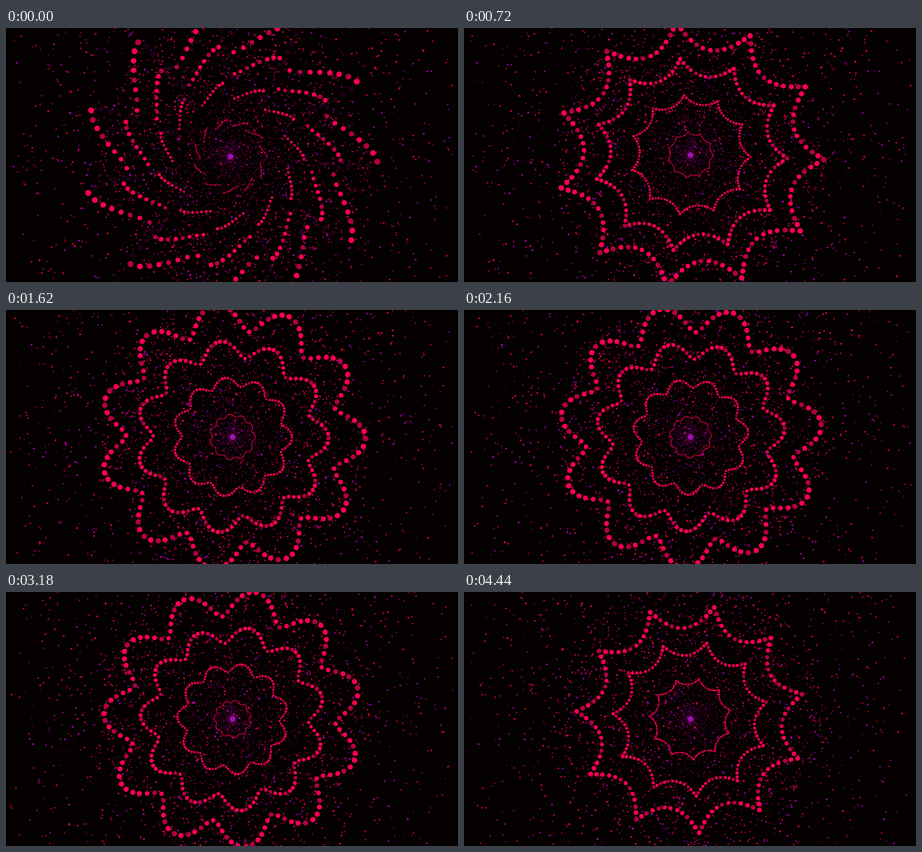
Write an HTML page with a canvas that moves like this. It is 800 px wide and 450 px high and loops after 4.5 s.

```html
<!DOCTYPE html>
<html lang="en">
<head>
<meta charset="utf-8">
<title>Flower tunnel</title>
<style>
html, body { margin: 0; width: 100%; height: 100%; overflow: hidden; background: #040100; }
canvas { display: block; }
</style>
</head>
<body>
<canvas id="stage" width="800" height="450"></canvas>
<script>
const ctx = document.getElementById('stage').getContext('2d');
const LOOP = 4500, LOBES = 11, DOTS_PER_LOBE = 12, GAP = 65;
const TAU = Math.PI * 2, DEG = Math.PI / 180;
const RED = '#ff0050', WINE = '#b4003f', PURPLE = '#aa00b8', PLUM = '#4c0044';

let seed = 7;
function random() {
  seed = (seed * 1664525 + 1013904223) % 4294967296;
  return seed / 4294967296;
}

function ease(t, from, to) {
  const f = Math.min(1, Math.max(0, (t - from) / (to - from)));
  return f * f * (3 - 2 * f);
}

const stars = Array.from({ length: 1050 }, () => ({
  reach: 392 * Math.sqrt(random()), angle: TAU * random(), y: 450 * random(),
  size: 1 + .9 * random(), alpha: .5 + .5 * random(),
  color: random() < .6 ? '#e80048' : PURPLE,
}));

const dust = Array.from({ length: 2200 }, () => {
  const r = 2 + 240 * Math.pow(random(), 1.4);
  return {
    r, angle: TAU * random(), alpha: .4 + .5 * random(),
    size: .6 + r * .004 * (.5 + random()),
    color: random() < .2 + .75 * Math.exp(-r / 40) ? PURPLE : '#d80046',
  };
});

// The petals start swept back, open into scallops, round off, sweep again and sharpen.
function poseAt(t) {
  const settle = ease(t, 0, 720), turn = ease(t, 1300, 3100);
  const sweep = ease(t, 3180, 3900), close = ease(t, 3900, 4440);
  const skew = .9 * (1 - settle) + sweep - close;
  return {
    skew,
    tip: (2 - 16 * turn + 7 * sweep - 5.5 * close) * DEG,
    radius: 260 - 24 * settle - 8 * turn + 7 * sweep - 33 * close,
    cusp: .3 + .5 * settle - 1.1 * ease(t, 720, 1620) + 1.1 * close,
    depth: .1 + .05 * skew,
    x: 401 - 4 * skew,
    y: 225 + 3 * skew,
  };
}

function dot(x, y, r, color, alpha = 1) {
  ctx.globalAlpha = alpha;
  ctx.fillStyle = color;
  ctx.beginPath();
  ctx.arc(x, y, r, 0, TAU);
  ctx.fill();
}

function polarDot(pose, r, angle, size, color, alpha) {
  dot(pose.x + r * Math.cos(angle), pose.y + r * Math.sin(angle), size, color, alpha);
}

// One lobe, tip to tip, as points spaced evenly along the curve.
function lobePoints({ tip, skew, cusp, depth }, tipR, level) {
  const wave = tipR * depth * (1 - .13 * level), steps = 96, path = [];
  let length = 0;
  for (let i = 0; i <= steps; i++) {
    const p = TAU * i / steps;
    const r = tipR - wave + wave * Math.cos(p);
    const angle = tip + (p + skew * (Math.cos(p) - 1) - cusp * Math.sin(p)) / LOBES;
    const last = path[i - 1];
    if (last) length += Math.hypot(r - last.r, r * (angle - last.angle));
    path.push({ r, angle, length, returning: p < Math.PI });
  }
  return Array.from({ length: DOTS_PER_LOBE }, (_, i) =>
    path.find(q => q.length >= length * i / DOTS_PER_LOBE));
}

function ring(pose, level) {
  const tipR = pose.radius - GAP * level;
  if (tipR < 20) return;
  const points = lobePoints(pose, tipR, level);
  for (let lobe = 0; lobe < LOBES; lobe++) {
    points.forEach(({ r, angle, returning }, i) => {
      const hidden = returning && i > 0 ? Math.min(1, pose.skew) : 0;
      const color = hidden > .4 ? PLUM : (lobe * 5 + i * 7) % 17 < 5 ? WINE : RED;
      polarDot(pose, r, angle + TAU * lobe / LOBES, r * .019 + .4, color,
        (1 - .7 * hidden) * (level > 2 ? .75 : 1));
    });
  }
}

function draw(t) {
  const pose = poseAt(t);
  ctx.globalAlpha = 1;
  ctx.fillStyle = '#040100';
  ctx.fillRect(0, 0, 800, 450);

  for (const s of stars)
    dot(400 + s.reach * Math.sin(s.angle + t * .00025), s.y, s.size, s.color, s.alpha);
  for (const d of dust)
    polarDot(pose, d.r, d.angle + pose.tip, d.size, d.color, d.alpha);
  for (let level = 3; level >= 0; level--) ring(pose, level);
  dot(pose.x, pose.y, 5, '#b414c8', .8);
}

function tick(now) {
  draw(now % LOOP);
  requestAnimationFrame(tick);
}
requestAnimationFrame(tick);
</script>
</body>
</html>
```
